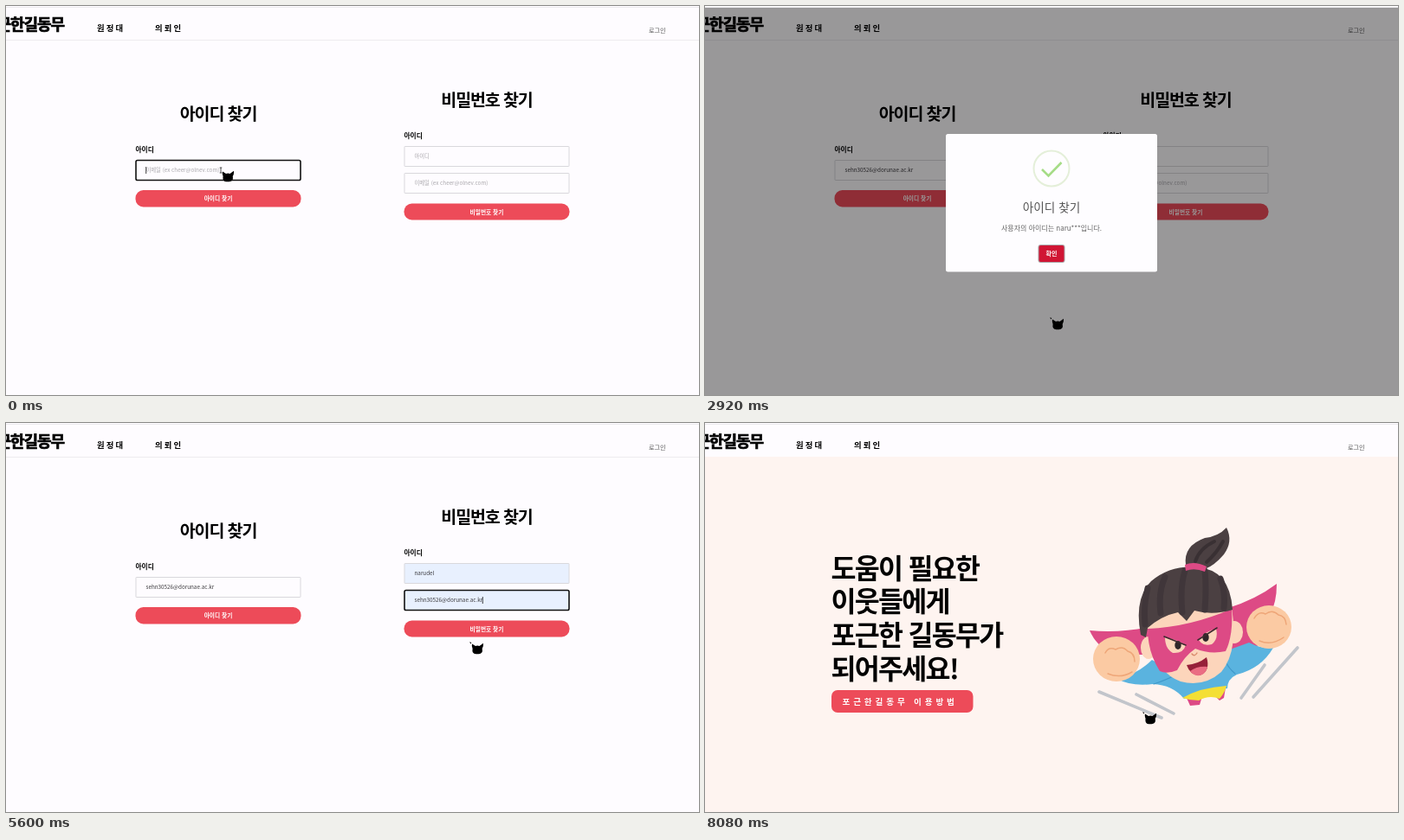
Animation, 800 px wide and 450 px high, one loop 8120 ms. Source, as an HTML page:

```html
<!DOCTYPE html>
<html lang="ko">
<head>
<meta charset="utf-8">
<title>아이디 찾기</title>
<style>
html, body { margin: 0; width: 100%; height: 100%; overflow: hidden; background: #fefcff; }
svg { display: block; width: 800px; height: 450px; }
text { font-family: "Noto Sans CJK KR", "Noto Sans CJK", "Noto Sans CJK JP", sans-serif; white-space: pre; }
</style>
</head>
<body>
<svg id="stage" viewBox="0 0 800 450"></svg>
<script>
const LOOP = 8120;
const EMAIL = 'sehn30526@dorunae.ac.kr', HINT = '이메일 (ex cheer@olnev.com)', USER = 'narudel';
const RED = '#ed4b59', PINK = '#dd4a85', SKIN = '#fcd5bb', FIST = '#fbcaa3', HAIR = '#4b4042', BLUE = '#5ab3df';

const label = (x, y, size, str, more = '') => `<text x="${x}" y="${y}" font-size="${size}" ${more}>${str}</text>`;
const bold = 'font-weight="700"', mid = 'text-anchor="middle"';
const rect = (x, y, w, h, rx, fill, more = '') =>
  `<rect x="${x}" y="${y}" width="${w}" height="${h}" rx="${rx}" fill="${fill}" ${more}/>`;
const path = (d, fill, more = '') => `<path d="${d}" fill="${fill}" ${more}/>`;
const oval = (x, y, rx, ry, fill, more = '') =>
  `<ellipse cx="${x}" cy="${y}" rx="${rx}" ry="${ry}" fill="${fill}" ${more}/>`;
const line = (d, color, width) => path(d, 'none', `stroke="${color}" stroke-width="${width}" stroke-linecap="round" stroke-linejoin="round"`);

const title = (x, y, str) => label(x, y, 19.5, str, `${bold} ${mid} letter-spacing="-1.1"`);
const button = (x, y, h, str) => rect(x, y, 191, h, 9, RED) +
  label(x + 95.5, y + h / 2 + 2.5, 6.7, str, `${bold} ${mid} fill="#fff"`);
const field = (id, x, y) => `<g id="${id}" transform="translate(${x} ${y})">` +
  rect(.5, .5, 190, 23, .5, '#fefcff', 'stroke="#d9d8dc"') + label(12, 14.2, 6.3, '') +
  '<path class="caret" d="M0 8v8" stroke="#111" stroke-width=".8"/></g>';

const form = title(245, 131.8, '아이디 찾기') + title(555, 116.3, '비밀번호 찾기') +
  label(149.5, 168.6, 7.7, '아이디', bold) + label(459.5, 152.8, 7.7, '아이디', bold) +
  field('findMail', 149.5, 178) + field('resetId', 459.5, 162) + field('resetMail', 459.5, 193) +
  button(149.5, 213, 19.5, '아이디 찾기') + button(459.5, 228.5, 19, '비밀번호 찾기');

const header = rect(0, 2, 800, 37, 0, '#fefcff') +
  label(-26, 27.7, 18, '포근한길동무', 'font-weight="900" letter-spacing="-1.06" stroke="#000" stroke-width=".7"') +
  label(105, 29, 9.4, '원정대', `${bold} letter-spacing="2.1"`) +
  label(172, 29, 9.4, '의뢰인', `${bold} letter-spacing="2.1"`) +
  label(742, 30.8, 7.1, '로그인', 'fill="#555"');

const girl =
  // cape and speed lines
  path('M444 240Q480 243 512 236L520 268L500 268L462 262Q450 254 444 240Z', PINK) +
  path('M604 214Q636 204 660 186Q660 208 652 222L636 262L604 270Z', PINK) +
  [[455, 311, 527, 341], [498, 314, 541, 336], [619, 318, 646, 280], [633, 317, 684, 260]]
    .map(([a, b, c, d]) => line(`M${a} ${b}L${c} ${d}`, '#c2c5cb', 3.6)).join('') +
  // body
  path('M556 318L560 327L571 326L574 316ZM587 314L594 321L599 318L601 306Z', PINK) +
  path('M476 296Q500 290 516 274Q560 302 606 262L628 254Q644 262 656 260Q642 284 614 291Q603 296 603 307Q580 310 553 319Q540 303 517 302Q492 305 476 296Z', BLUE) +
  path('M551 318Q572 306 602 304Q600 312 594 319Q582 314 570 321Q560 321 551 318Z', '#f4df35') +
  line('M518 302Q533 297 542 292M612 290Q604 283 601 276', '#3f98ca', 1.2) +
  // fists
  oval(475, 273, 27, 26, FIST) + oval(651, 236, 26, 25, FIST) +
  line('M462 266Q466 258 474 262Q482 257 488 264Q496 266 496 276M465 290Q480 296 493 288M634 226Q639 217 647 221Q655 215 662 222Q670 223 671 233M640 252Q654 258 668 248', '#eea678', 1.5) +
  // head
  oval(512, 260, 9, 13, SKIN) + oval(611, 242, 10, 13, SKIN) +
  path('M509 218Q560 190 608 213Q616 264 596 288Q576 306 549 299Q512 286 509 218Z', SKIN) +
  path('M511 238Q560 236 608 215Q610 246 601 264Q583 268 566 261Q553 270 545 286Q533 291 525 287Q511 265 511 238Z', PINK) +
  path('M531 248Q544 250 555 257Q552 267 540 266Q531 261 531 248ZM570 251Q577 241 590 238Q593 250 585 256Q575 259 570 251Z', SKIN) +
  oval(546, 257, 3.7, 5, '#302629') + oval(578, 248, 3.7, 5, '#302629') +
  line('M530 247L555 257M569 251L591 237', '#40282f', 1.6) +
  line('M562 267Q565 271 568 266', '#d98b6d', 1.4) +
  path('M556 280Q569 279 579 271Q584 287 571 292Q560 292 556 280Z', '#962039') +
  path('M560 287Q568 281 580 282Q578 291 571 292Q564 293 560 287Z', '#ea6d83') +
  // hair
  path('M555 164Q552 142 577 133Q593 131 602 121Q610 137 599 152Q588 165 577 169Z', HAIR) +
  line('M566 160Q571 145 588 137M579 161Q591 150 598 137', '#393033', 4) +
  path('M503 245Q495 203 515 183Q538 164 568 167Q606 169 609 216Q586 223 565 217L556 229L546 219Q527 223 511 237L509 248Z', HAIR) +
  line('M511 191Q506 211 508 233M531 178Q523 196 526 220M554 171Q548 190 551 219M577 171Q579 190 577 216M595 180Q601 195 599 214', '#40363a', 7) +
  path('M554 164Q565 159 579 166L577 172Q565 167 555 171Z', PINK);

const hero = rect(0, 39, 800, 411, 0, '#fef4f0') +
  ['도움이 필요한', '이웃들에게', '포근한 길동무가', '되어주세요!']
    .map((s, i) => label(145.5, 179.6 + i * 38.8, 31.5, s, `${bold} letter-spacing="-1.7"`)).join('') +
  rect(146, 309, 163.5, 26, 7, RED) +
  label(158.5, 325.5, 9.6, '포근한길동무 이용방법', `${bold} fill="#fff" letter-spacing="3.85"`) + girl;

// Modal coordinates are relative to its centre.
function modal(id, h, heading, lines) {
  const top = -h / 2;
  return `<g id="${id}"><rect class="shade" y="2" width="800" height="448" fill="#000"/><g class="box">` +
    rect(-122, top, 244, h, 2.5, '#fefdff') +
    `<circle cy="${top + 40}" r="20.5" fill="none" stroke="#e4efd9" stroke-width="2"/>` +
    `<path class="check" d="M-11 ${top + 41}l7.5 7.5l15 -15.5" pathLength="1" stroke-dasharray="1 2" fill="none" stroke="#a5dc86" stroke-width="2.6"/>` +
    label(0, top + 90.3, 13.6, heading, `font-weight="500" ${mid} fill="#545454"`) +
    lines.map((s, i) => label(0, top + 112 + i * 11, 8, s, `${mid} fill="#666"`)).join('') +
    rect(-15.5, -top - 31.5, 31, 21, 3, '#aaa5a8') + rect(-14.5, -top - 30.5, 29, 19, 2, '#d01534') +
    label(0, -top - 18.4, 7, '확인', `${bold} ${mid} fill="#fff"`) + '</g></g>';
}

const $ = id => document.getElementById(id);
$('stage').innerHTML = rect(0, 0, 800, 450, 0, '#fefcff') + rect(0, 1.5, 800, 1, 0, '#dddbe0') + header +
  `<g id="form">${rect(0, 39, 800, 1, 0, '#eeecef')}${form}</g><g id="hero">${hero}</g>` +
  modal('foundId', 159.5, '아이디 찾기', [`사용자의 아이디는 ${USER.slice(0, 4)}***입니다.`]) +
  modal('linkSent', 171, '비밀번호 재설정 링크 전송',
    ['입력하신 이메일로 재설정 링크가 전송되었습니다. 메일함을 확인', '해주세요.']) +
  '<g id="cursor">' + path('M2 1.5L6 4Q8 3.2 10.5 4L15 .7Q15.4 5 13.7 7Q15 12.8 9.5 13.3H6.5Q1.5 13 2.6 7Q1.3 4 2 1.5Z', '#000') +
  '<path id="arrow" d="M-.8 -.8L1.4 0L.2 1.5Z"/>' +
  '<path id="beam" d="M-1.3 -3H1.3M0 -3V3M-1.3 3H1.3" stroke="#222" stroke-width=".8"/></g>';

const clamp = v => Math.max(0, Math.min(1, v));
const show = (el, on) => el.setAttribute('visibility', on ? 'inherit' : 'hidden');

// Piecewise path through [time, ...values].
function along(keys, t, ease = p => p) {
  const i = keys.findIndex(k => k[0] > t);
  if (i < 0) return keys[keys.length - 1].slice(1);
  if (!i) return keys[0].slice(1);
  const a = keys[i - 1], b = keys[i], p = ease((t - a[0]) / (b[0] - a[0]));
  return a.slice(1).map((v, n) => v + (b[n + 1] - v) * p);
}

const POINTER = [[0, 248, 190], [1900, 248, 190], [2080, 246, 221], [2250, 246, 221], [2850, 399, 361],
  [2960, 399, 361], [3250, 396, 284], [3660, 395, 284], [4050, 490, 174], [4300, 490, 174], [4450, 495, 204],
  [4700, 495, 204], [4950, 505, 247], [5100, 505, 247], [5350, 534, 263], [5560, 536, 254], [5640, 536, 254],
  [5780, 536, 241], [6000, 536, 241], [6500, 533, 326], [7720, 532, 326], [8040, 506, 335], [LOOP, 506, 335]];
const POP = [[0, .7], [135, 1.05], [240, .95], [300, 1]];

function setField(id, value, hint, focus, filled, t) {
  const [box, text, caret] = $(id).children;
  box.setAttribute('fill', filled ? '#e8f0fe' : '#fefcff');
  box.setAttribute('stroke', focus ? '#111' : '#d9d8dc');
  box.setAttribute('stroke-width', focus ? 1.6 : 1);
  box.setAttribute('rx', focus ? 1.8 : .5);
  text.textContent = value || hint;
  text.setAttribute('fill', value ? '#3b3a3d' : '#a9a7ab');
  const x = 12.2 + (value ? text.getComputedTextLength() : 0);
  caret.setAttribute('transform', `translate(${x} 0)`);
  show(caret, focus && t % 1000 < 500);
}

function setModal(id, y, t, open, close) {
  const el = $(id), age = t - open, out = clamp((t - close) / 150);
  show(el, age >= 0 && out < 1);
  const scale = along(POP, age)[0] * (1 - out / 2);
  const box = el.querySelector('.box'), check = el.querySelector('.check');
  box.setAttribute('transform', `translate(400 ${y}) scale(${scale})`);
  box.setAttribute('opacity', 1 - out);
  el.querySelector('.shade').setAttribute('opacity', .4 * clamp(age / 100) * (1 - out));
  const drawn = clamp((age - 405) / 250);
  check.setAttribute('stroke-dashoffset', 1 - drawn);
  show(check, drawn > 0);
}

function draw(t) {
  const onHero = t >= 6830;
  show($('form'), !onHero);
  show($('hero'), onHero);

  const typed = Math.floor(EMAIL.length * clamp((t - 250) / 1450));
  setField('findMail', EMAIL.slice(0, typed), HINT, !onHero && t < 2080, false, typed < EMAIL.length ? 0 : t - 1700);
  setField('resetId', t >= 4480 ? USER : '', '아이디', t >= 4080 && t < 4700, t >= 4480, t - 4080);
  setField('resetMail', t >= 5000 ? EMAIL : '', HINT, t >= 4700 && t < 5800, t >= 5000, t - 4500);
  if (onHero) document.querySelectorAll('.caret').forEach(c => show(c, false));

  setModal('foundId', 227.75, t, 2150, 3440);
  setModal('linkSent', 228, t, 6870, 7700);

  const [x, y] = along(POINTER, t, p => p * p * (3 - 2 * p));
  $('cursor').setAttribute('transform', `translate(${x} ${y})`);
  const beam = t < 1960 || (t > 3960 && t < 4880);
  show($('beam'), beam);
  show($('arrow'), !beam);
}

const start = performance.now();
(function tick() {
  draw((performance.now() - start) % LOOP);
  requestAnimationFrame(tick);
})();
</script>
</body>
</html>
```
